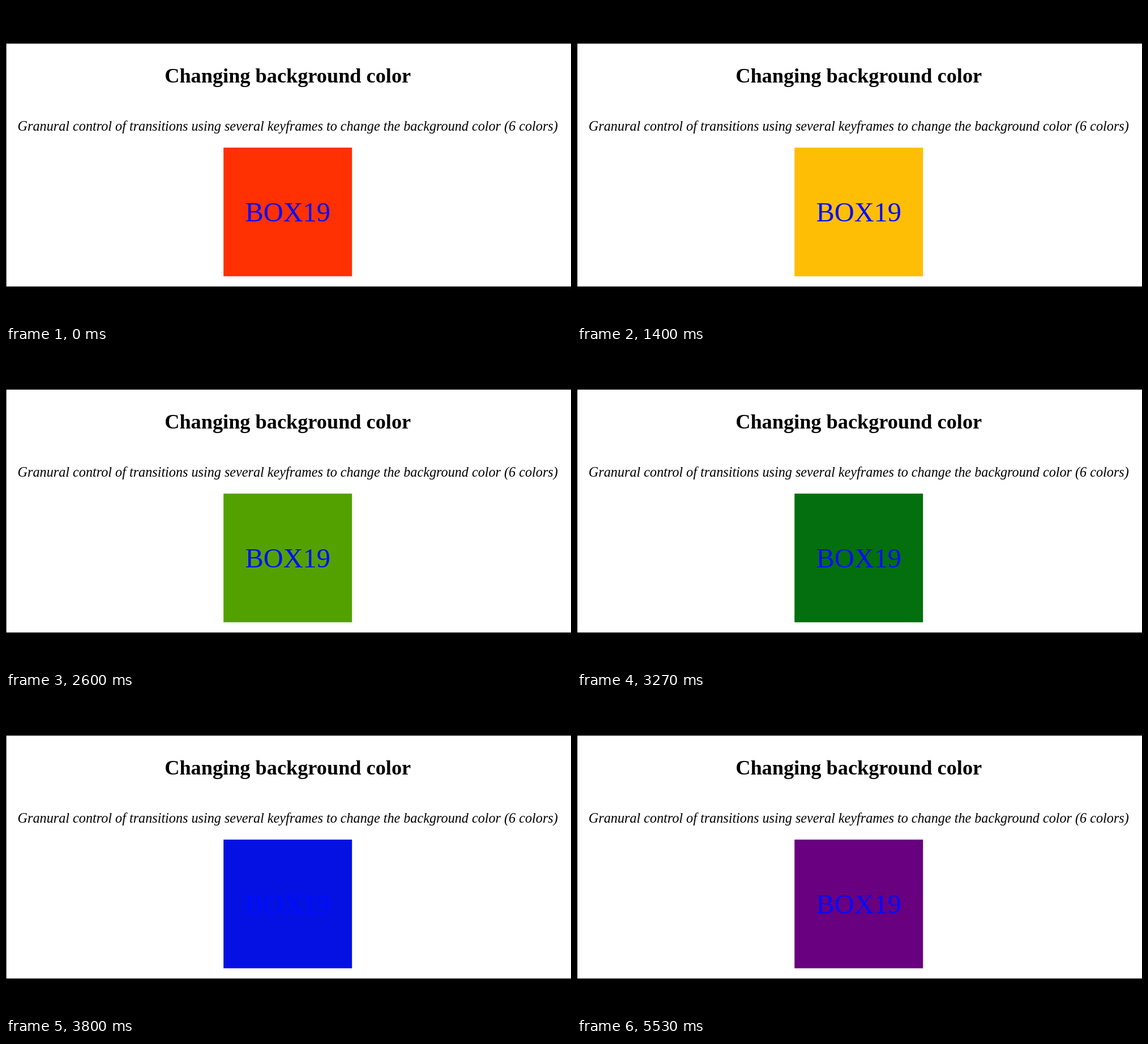
Recreate the animation shown at these times as an HTML page with a canvas. Size 998 by 561 pixels, loop 5.6 s.

```html
<!DOCTYPE html>
<html lang="en">
<head>
<meta charset="utf-8">
<title>Changing background color</title>
<style>
  html, body { margin: 0; width: 100%; height: 100%; overflow: hidden; background: #000; }
  canvas { display: block; }
</style>
</head>
<body>
<canvas id="stage" width="998" height="561"></canvas>
<script>
const ctx = document.getElementById("stage").getContext("2d");
const LOOP = 5600;
const STEP = 1000;      // time between two colors
const RED_AT = 200;     // the alternating run turns around at red here
const CENTER = 497.7;
const SERIF = '"Liberation Serif", "Times New Roman", serif';

const colors = [
  [255, 0, 0],
  [255, 163, 8],
  [255, 255, 0],
  [4, 117, 0],
  [4, 4, 255],
  [112, 0, 118]
];

// CSS "ease": cubic-bezier(.25, .1, .25, 1)
const bezier = (a, b, u) => 3 * a * u * (1 - u) ** 2 + 3 * b * u * u * (1 - u) + u ** 3;

function ease(x) {
  let lo = 0, hi = 1;
  for (let i = 0; i < 24; i++) {
    const mid = (lo + hi) / 2;
    if (bezier(0.25, 0.25, mid) < x) lo = mid; else hi = mid;
  }
  return bezier(0.1, 1, lo);
}

function boxColor(time) {
  const last = colors.length - 1;
  let pos = Math.abs(time - RED_AT) / STEP;
  if (pos > last) pos = 2 * last - pos;
  const i = Math.min(Math.floor(pos), last - 1);
  const k = ease(pos - i);
  const mix = colors[i].map((c, n) => Math.round(c + (colors[i + 1][n] - c) * k));
  return `rgb(${mix.join(",")})`;
}

function rect(color, x, y, w, h) {
  ctx.fillStyle = color;
  ctx.fillRect(x, y, w, h);
}

function label(text, style, size, y, color) {
  ctx.font = `${style} ${size}px ${SERIF}`;
  ctx.fillStyle = color;
  ctx.fillText(text, CENTER, y);
}

function draw(time) {
  rect("#000", 0, 0, 998, 561);
  rect("#fff", 0.7, 66.4, 997.3, 428.4);
  label("Changing background color", "bold", 36.3, 135, "#000");
  label("Granural control of transitions using several keyframes to change the background color (6 colors)",
    "italic", 24.2, 220, "#000");
  rect(boxColor(time), 384.2, 249.8, 227, 227);
  label("BOX19", "normal", 48.4, 379.5, "#000cff");
}

ctx.textAlign = "center";
const start = performance.now();

function tick() {
  draw((performance.now() - start) % LOOP);
  requestAnimationFrame(tick);
}
tick();
</script>
</body>
</html>
```
